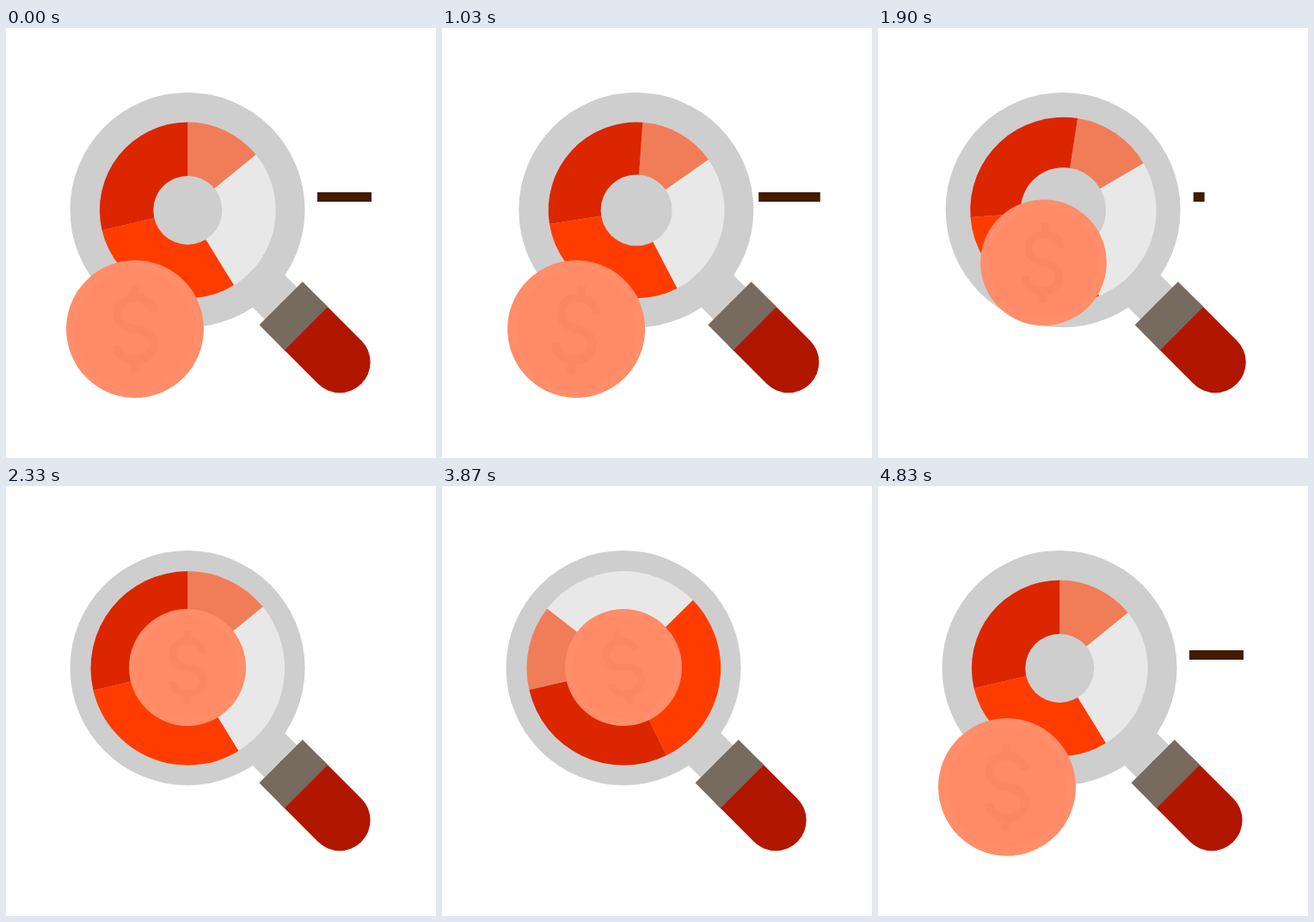
Write an HTML page that moves like this. It is 500 px wide and 500 px high and loops after 5010 ms.

```html
<!DOCTYPE html>
<html lang="en">
<head>
<meta charset="utf-8">
<title>Market research</title>
<style>
  html, body { margin: 0; width: 100%; height: 100%; overflow: hidden; background: #fff; }
  svg { display: block; width: 100%; height: 100%; }
</style>
</head>
<body>
<svg viewBox="0 0 500 500">
  <rect id="dash" y="191" height="11" fill="#431b00"/>
  <g id="glass">
    <g transform="rotate(45)">
      <rect x="125" y="-26.5" width="40" height="53" fill="#cecece"/>
      <rect x="153.7" y="-35.6" width="132.3" height="71.2" rx="35.6" fill="#b11600"/>
      <rect x="153.7" y="-35.6" width="41.5" height="71.2" fill="#776a5f"/>
    </g>
    <circle r="136.5" fill="#cecece"/>
    <g transform="translate(.3 .4)">
      <g id="pie"></g>
      <circle id="hole" fill="#cecece"/>
    </g>
  </g>
  <g id="coin">
    <circle r="80" fill="#ff8d69"/>
    <circle r="69" fill="#ff8b66"/>
    <path d="M21-19C21-30 11-36 0-36S-20-29-20-18S-11-1 0 0S21 7 21 18S11 36 0 36S-21 30-21 19M0-51V-36M0 36V51"
      fill="none" stroke="#fb8661" stroke-width="10"/>
  </g>
</svg>
<script>
const LOOP = 5010;
const IN = 1400, HELD = 2333, OUT = 3867, DONE = 4833;

const $ = id => document.getElementById(id);
const set = (el, attrs) => { for (const k in attrs) el.setAttribute(k, attrs[k]); };
const mix = (a, b, u) => a + (b - a) * u;

// Eased 0 to 1 between two times
function ramp(t, from, to) {
  const u = Math.min(1, Math.max(0, (t - from) / (to - from)));
  return u * u * (3 - 2 * u);
}

// Swing to low, then high, then back to rest; followers lag behind the glass
function sway(t, lag, low, high) {
  const left = 400 + lag, right = 1200 + lag, rest = 2200 + lag * 2 / 3;
  return low * ramp(t, 0, left) + (high - low) * ramp(t, left, right) - high * ramp(t, right, rest);
}

const point = deg => {
  const a = deg * Math.PI / 180;
  return `${Math.sin(a)} ${-Math.cos(a)}`;
};

// Slices run clockwise from the top; each entry is colour and end angle
let from = 0;
for (const [fill, to] of [['#f17d58', 50.8], ['#e8e8e8', 148.4], ['#ff3c00', 256.8], ['#db2600', 360]]) {
  const slice = document.createElementNS($('pie').namespaceURI, 'path');
  set(slice, { d: `M0 0L${point(from)}A1 1 0 0 1 ${point(to)}Z`, fill });
  $('pie').append(slice);
  from = to;
}

function draw(t) {
  const back = ramp(t, OUT, DONE);
  const merge = ramp(t, IN, HELD) - back;

  const shift = sway(t, 0, -19.2, 19.2);
  set($('glass'), { transform: `translate(${211 + shift} 211.5)` });

  const turn = sway(t, 200, -16, 20) + 360 * ramp(t, 2577, 4577);
  set($('pie'), { transform: `rotate(${turn}) scale(${mix(102.4, 112.8, merge)})` });
  set($('hole'), { r: 40 + 10 * (ramp(t, 700, 2070) - back) });

  const x = mix(150, 211, merge) + sway(t, 180, -15, 20.5);
  const y = mix(350, 211, merge);
  const tilt = sway(t, 70, -10, 12) + 13.5 * Math.sin(2 * Math.PI * ramp(t, HELD, DONE));
  set($('coin'), { transform: `translate(${x} ${y}) rotate(${tilt}) scale(${mix(1, 0.85, merge)})` });

  const left = 362 + sway(t, 100, -18, 14.8);
  const fill = 1 - ramp(t, 1300, 2150) + back;
  set($('dash'), { x: left, width: (425 + shift - left) * fill });
}

const start = performance.now();
function tick() {
  draw((performance.now() - start) % LOOP);
  requestAnimationFrame(tick);
}
tick();
</script>
</body>
</html>
```
